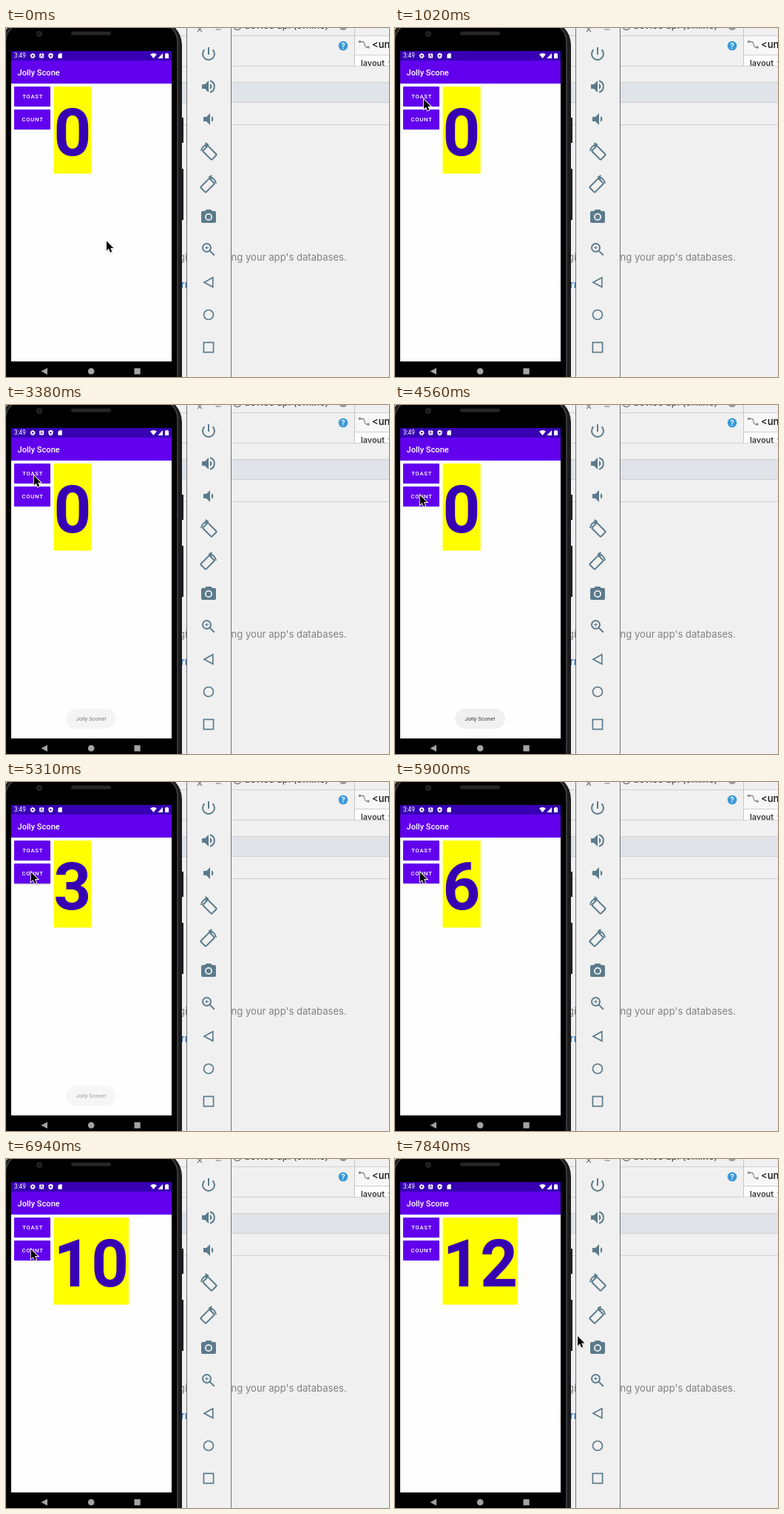
These frames come from a looping animation (518 px wide and 471 px high, 7.99 s). An HTML page:

```html
<!DOCTYPE html>
<html lang="en">
<head>
<meta charset="utf-8">
<title>Counter app in an emulator</title>
<style>
  html, body { margin: 0; width: 100%; height: 100%; overflow: hidden; background: #f0f0f0; }
  svg { display: block; width: 518px; height: 471px; }
  .ide { font-family: Inter, "Liberation Sans", sans-serif; }
  .app { font-family: Roboto, "Liberation Sans", sans-serif; }
  .label { font-size: 7.75px; font-weight: 500; letter-spacing: .69px; fill: #fff; text-anchor: middle; }
  .line { fill: none; stroke: #5b7b8b; stroke-width: 2; }
</style>
</head>
<body>
<svg viewBox="0 0 518 471" xmlns="http://www.w3.org/2000/svg">
  <defs>
    <filter id="soft" x="-30%" y="-30%" width="160%" height="160%"><feGaussianBlur stdDeviation="1"/></filter>
    <clipPath id="formClip"><rect x="472" y="0" width="46" height="51"/></clipPath>
    <path id="arrow" d="M0 0V13L3 10.2L5 15.2L7.3 14.2L5.3 9.4H9.4Z"/>
    <path id="speaker" d="M-9 -3H-5L0 -8V8L-5 3H-9ZM2 -4A4.5 4.5 0 0 1 2 4Z"/>
    <g id="rotate" class="line">
      <rect x="-8.5" y="-5" width="17" height="10" rx="1" transform="translate(1.5 1.5) rotate(45)"/>
      <path d="M-10 -1A10 10 0 0 1 -1 -10M-4.5 -12L-1 -9.8L-4 -6.5"/>
    </g>
  </defs>

  <!-- IDE window -->
  <g class="ide">
    <rect width="518" height="471" fill="#f0f0f0"/>
    <rect y="74" width="518" height="26" fill="#e0e4e9"/>
    <path d="M0 10.5H471M0 51.5H518M0 73.5H518M0 100.5H518M0 130.5H518" stroke="#d0d0d0"/>
    <circle cx="313" cy="-2.5" r="5" fill="none" stroke="#777" stroke-width="1.3"/>
    <circle cx="456" cy="-2.5" r="5.5" fill="#9a9a9a"/>
    <text x="322" y=".8" font-size="13" fill="#333">device api (offline)</text>
    <circle cx="456" cy="24" r="6.3" fill="#3a9ad9"/>
    <text x="456" y="27.7" font-size="10" font-weight="600" fill="#fff" text-anchor="middle">?</text>
    <g clip-path="url(#formClip)">
      <rect x="472" y="11" width="46" height="26" fill="#f7f7f7"/>
      <rect x="472" y="37" width="46" height="15" fill="#fff"/>
      <path d="M472 10.5H518M472 36.5H518" stroke="#d0d0d0"/>
      <path d="M479.5 18.5H482C487 18.5 483 26 488 26H489" fill="none" stroke="#8c8c8c" stroke-width="1.3"/>
      <circle cx="478.5" cy="18.5" r="1.8" fill="#8c8c8c"/>
      <circle cx="490" cy="26" r="1.8" fill="#8c8c8c"/>
      <text x="495" y="27" font-size="13" font-weight="500" fill="#111">&lt;unnamed&gt;</text>
      <text x="480" y="51" font-size="11" font-weight="500" fill="#222">layout_width</text>
    </g>
    <path d="M471.5 0V51" stroke="#c4c4c4"/>
    <g font-size="13.1" fill="#808080">
      <text x="234" y="314">gi</text>
      <text x="304.5" y="314">ng your app's databases.</text>
    </g>
    <text x="236.5" y="351" font-size="13.1" font-weight="500" fill="#2470c0">rn</text>
  </g>

  <!-- Phone -->
  <path d="M236 121H240V155H236ZM236 190H240V259H236Z" fill="#1c1c1e"/>
  <rect x="-7" y="-11" width="245" height="520" rx="34" fill="#1d1d1f"/>
  <rect x="-.5" y="-6" width="232.5" height="520" rx="24" fill="#000" stroke="#444447" stroke-width="1.6"/>
  <circle cx="45" cy="8" r="4" fill="#242427"/>
  <circle cx="45" cy="8" r="1.8" fill="#121217"/>
  <rect x="88" y="4.8" width="54" height="5" rx="2.5" fill="#262628"/>

  <g class="app">
    <rect x="7" y="31" width="217" height="419" fill="#fefefe"/>
    <rect x="7" y="31" width="217" height="13.5" fill="#3700b3"/>
    <rect x="7" y="44" width="217" height="31" fill="#6200ee"/>
    <text x="11" y="40.4" font-size="8.2" fill="#fff">3:49</text>
    <g fill="#fff">
      <circle cx="36.2" cy="37.5" r="2.1" fill="none" stroke="#fff" stroke-width="1.6"/>
      <circle cx="36.2" cy="37.5" r="3.2" fill="none" stroke="#fff" stroke-dasharray="1.35 2"/>
      <rect x="45.2" y="34.5" width="6" height="6" rx=".8"/>
      <path d="M46.6 39.5L48.2 35.6L49.8 39.5" fill="none" stroke="#3700b3" stroke-width=".8"/>
      <path d="M60.5 33.8L63.6 35V37.4Q63.6 40.2 60.5 41.3Q57.4 40.2 57.4 37.4V35Z"/>
      <path d="M59 37.5H62M60.5 36V39" stroke="#3700b3" stroke-width=".8"/>
      <path d="M72.2 34.2H75.8V40.8H70.4V36Z"/>
      <path d="M195 35.6Q199.5 32.6 204 35.6L199.5 41Z"/>
      <path d="M212 34V41H205.4Z"/>
      <path d="M215 34.8H216.4V34H218.6V34.8H220V41H215Z"/>
    </g>
    <text x="15.5" y="63.7" font-size="11.1" font-weight="500" fill="#fff">Jolly Scone</text>

    <g id="buttons"></g>

    <rect id="panel" x="64.5" y="79" height="117.5" fill="#ff0"/>
    <text id="count" x="64.5" y="172.2" font-size="88.6" font-weight="700" fill="#3700b3"></text>

    <g id="toast">
      <rect x="81" y="410" width="68" height="27" rx="13.5" fill="#f0f0f0"/>
      <text x="115" y="426.2" font-size="7.7" fill="#3c3c3c" text-anchor="middle">Jolly Scone!</text>
    </g>
  </g>

  <g fill="#a3a3a3">
    <path d="M47.5 463.3L56 458.8V467.8Z"/>
    <circle cx="115.2" cy="463.3" r="4.3"/>
    <rect x="173.5" y="459.2" width="8.2" height="8.2"/>
  </g>

  <!-- Emulator toolbar -->
  <rect x="244" y="-2" width="61" height="475" fill="#f0f0f0"/>
  <path d="M244.5 0V471M304.5 0V471" stroke="#707070"/>
  <path d="M259 -1L265 5M265 -1L259 5M283.5 2H290.5" stroke="#777" stroke-width="1.1" fill="none"/>
  <g fill="#5b7b8b">
    <path class="line" transform="translate(274 35)" d="M0 -9V1M-5.6 -5.7A8 8 0 1 0 5.6 -5.7"/>
    <g transform="translate(274 79)">
      <use href="#speaker"/>
      <path class="line" d="M2 -7.7A8 8 0 0 1 2 7.7"/>
    </g>
    <use href="#speaker" transform="translate(276 123)"/>
    <use href="#rotate" transform="translate(274 167)"/>
    <use href="#rotate" transform="translate(274 211) scale(-1 1)"/>
    <g transform="translate(274 255)">
      <path d="M-3 -10H3L5 -8H-5Z"/>
      <rect x="-10" y="-8" width="20" height="16" rx="2"/>
      <circle r="4.1" fill="none" stroke="#f0f0f0" stroke-width="1.8"/>
    </g>
    <g transform="translate(274 299)" class="line">
      <circle cx="-2.5" cy="-2.5" r="5.5"/>
      <path d="M1.6 1.6L7.8 7.8"/>
      <path d="M-5 -2.5H0M-2.5 -5V0" stroke-width="1"/>
    </g>
    <g class="line" style="stroke-width: 1.7px">
      <path d="M268 343.2L279.8 336.8V349.6Z"/>
      <circle cx="274" cy="387" r="6.5"/>
      <rect x="267.4" y="424.4" width="13.2" height="13.2"/>
    </g>
  </g>

  <g id="cursor">
    <use href="#arrow" transform="translate(.6 1.4)" opacity=".3" filter="url(#soft)"/>
    <use href="#arrow" stroke="#fff" stroke-width="1.8" paint-order="stroke"/>
  </g>
</svg>

<script>
const LOOP = 7990, STEP = 148, LEAD = 30;
const $ = id => document.getElementById(id);
const clamp = (v, lo, hi) => Math.min(hi, Math.max(lo, v));
const ease = u => u * u * (3 - 2 * u);

const button = (id, y, label) => `
  <rect id="${id}" x="11" y="${y + 1}" width="49" height="27" filter="url(#soft)"/>
  <rect x="11" y="${y}" width="49" height="27" rx="1" fill="#6200ee"/>
  <text class="label" x="36.1" y="${y + 16.3}">${label}</text>`;
$("buttons").innerHTML = button("showShade", 79, "TOAST") + button("addShade", 110, "COUNT");

const stops = [
  [0, 136, 287.5], [3, 51, 98], [7, 39, 96.3], [18, 37.8, 95.3], [23, 37.8, 95.3],
  [27, 37, 130], [31, 33.7, 121.7], [49, 33.7, 121.7], [51, 244.5, 241], [53, 247, 239]
];

function pointer(n) {
  const i = stops.findIndex(s => s[0] > n);
  if (i < 0) return stops.at(-1).slice(1);
  const [a, ...from] = stops[i - 1], [b, ...to] = stops[i];
  const u = ease((n - a) / (b - a));
  return from.map((v, k) => v + (to[k] - v) * u);
}

function draw(t) {
  const n = Math.floor((t + LEAD) / STEP);
  const clicks = clamp(1 + Math.floor((n - 33) * .6 + .81), 0, 12);
  $("cursor").setAttribute("transform", `translate(${pointer(n)})`);
  $("count").textContent = clicks;
  $("panel").setAttribute("width", clicks > 9 ? 101.5 : 51.2);
  $("toast").setAttribute("opacity", clamp(Math.min((n - 21) / 3, (38 - n) / 4), 0, 1));
  $("showShade").setAttribute("opacity", n >= 20 && n < 23 ? .3 : .08);
  $("addShade").setAttribute("opacity", n >= 33 && n < 40 ? .3 : .08);
}

const start = performance.now();
function tick() {
  draw((performance.now() - start) % LOOP);
  requestAnimationFrame(tick);
}
tick();
</script>
</body>
</html>
```
